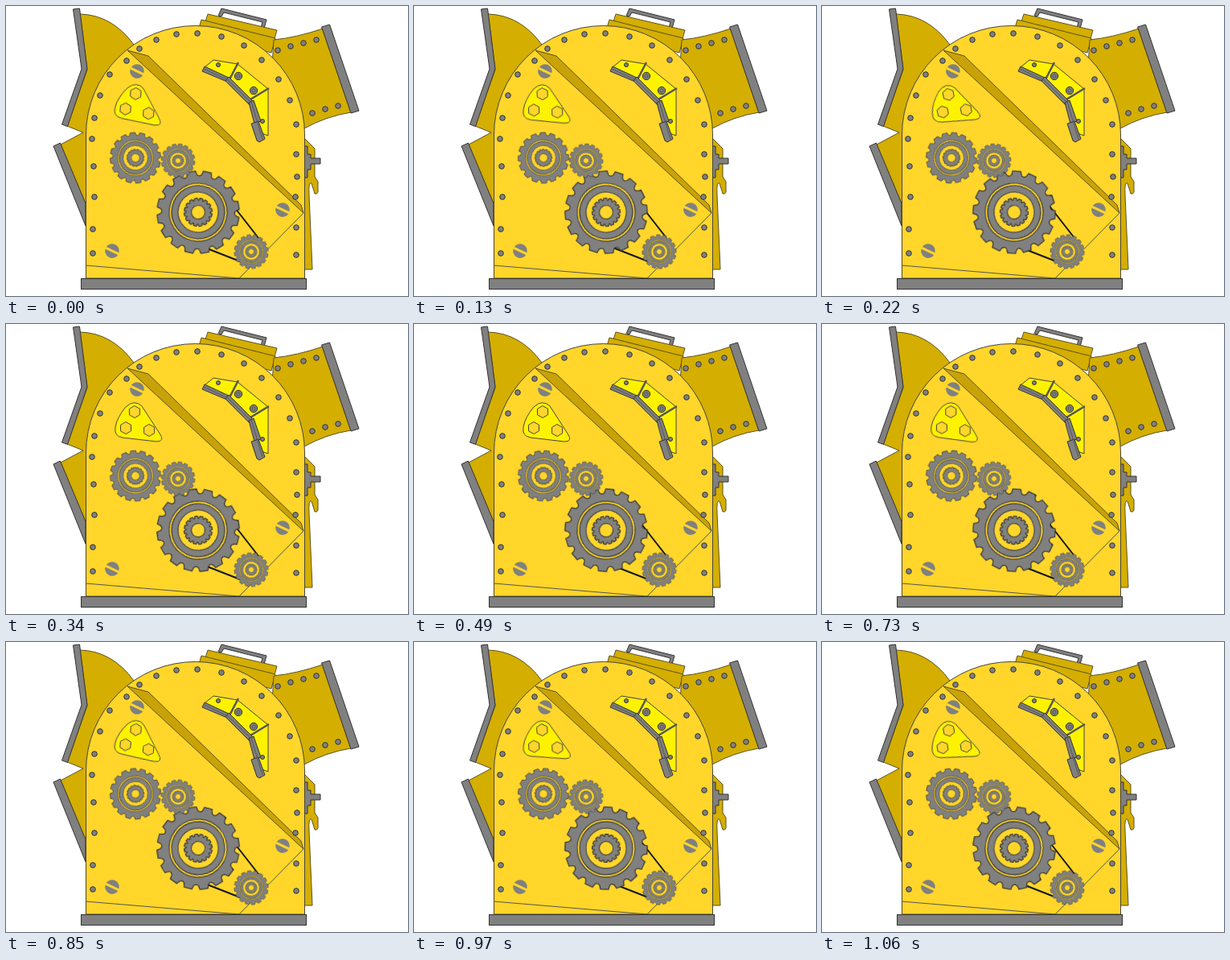
An HTML page for the animation above (1160 ms loop, 500 by 360 pixels).

```html
<!DOCTYPE html>
<html lang="en">
<head>
<meta charset="utf-8">
<title>Gear machine</title>
<style>
  html, body { margin: 0; width: 100%; height: 100%; overflow: hidden; background: #fff; }
  svg { display: block; width: 500px; height: 360px; }
  .body { fill: #ffd629; stroke: #444; }
  .dark { fill: #d4ae00; stroke: #5c5220; }
  .steel { fill: #808080; stroke: #333; }
  .bright { fill: #fff200; stroke: #444; }
  .line { fill: none; stroke: #555; }
  .belt { fill: none; stroke: #151515; stroke-width: 2; }

  .spin { animation: spin 1160ms infinite; }
  .plate { transform-origin: 163px 124px; animation: sway 1160ms infinite; }

  /* --w is the turn per 30 ms step; both ends of the loop rest for 100 ms */
  @keyframes spin {
    0% { transform: rotate(0deg); animation-timing-function: step-end; }
    8.6207% { transform: rotate(calc(var(--w) * 1deg)); animation-timing-function: steps(32); }
    91.3793%, 100% { transform: rotate(calc(var(--w) * 33deg)); }
  }
  @keyframes sway {
    0% { transform: rotate(5deg); animation-timing-function: step-end; }
    8.6207% { transform: rotate(2deg); animation-timing-function: steps(4); }
    18.9655% { transform: rotate(-11deg); animation-timing-function: steps(6); }
    34.4828% { transform: rotate(5deg); animation-timing-function: steps(6); }
    50% { transform: rotate(-5deg); animation-timing-function: steps(9); }
    73.2759% { transform: rotate(6deg); animation-timing-function: steps(7); }
    91.3793%, 100% { transform: rotate(-9deg); }
  }
</style>
</head>
<body>
<svg viewBox="0 0 500 360">
  <!-- chutes, lid and side lever -->
  <path class="dark" d="M92 10Q132 11 159 48L120 160V255H99L66 173L96 157L76 149L101 79Z"/>
  <path class="steel" d="M83.5 4L91.5 3L101 78L76.5 149.5L69.5 147L94 78Z"/>
  <path class="steel" d="M59 174L67.5 170L99 245V273Z"/>
  <path class="steel" d="M264 12L268 3L324 17L321 28L317 27L319 20L271 8L268 13Z"/>
  <path class="dark" d="M251 10L337 30L334 41L248 19Z"/>
  <path class="dark" d="M243 17L335 40L330 58L238 34Z"/>
  <path class="dark" d="M333 42Q362 39 394 28L429 132Q398 137 371 152L330 90Z"/>
  <path class="steel" d="M392.5 26L402.5 23L439 130L429 133Z"/>
  <path class="dark" d="M371 164L384 177V212L388 218V231Q387 234 384 233L380 220Q376 217 377 235L381 327H371Z"/>
  <path class="steel" d="M371 174h4v10h4v5h12v7h-12v7h-4v10h-4z"/>

  <!-- housing -->
  <path class="body" d="M99.5 338V160A136 135.5 0 0 1 371.5 160V338Z"/>
  <path class="line" d="M99 322L290 338L370 257"/>
  <path class="dark" style="fill:#c9a208" d="M151 55L177 62L367 247L370 257Z"/>
  <rect class="steel" x="93.5" y="338.5" width="280" height="13"/>
  <g id="rivets"></g>
  <g id="screws"></g>

  <!-- liner bracket -->
  <path class="bright" d="M258 67L288 72L326 103L326 161L318 158L304 119L277 91L247 76Z"/>
  <path class="line" stroke-width="2.5" d="M289 70L277 93M327 102L299 119"/>
  <path class="steel" d="M247 75L277 89L275 94L244 81Z"/>
  <path class="steel" d="M277 88L308 119L304 124L273 93Z"/>
  <path class="line" d="M246 78L276 92L306 121"/>
  <path class="steel" d="M302 120L308 117L317 143L309 146Z"/>
  <path class="steel" d="M305 146L314 143L322 165L315 169L312 167Z"/>
  <path class="line" d="M305 119L319 165"/>
  <g id="nuts"></g>

  <g class="plate">
    <path class="bright" d="M149 103Q160 93 169 102L191 136Q198 146 187 146L145 141Q134 139 136 128Q138 116 149 103Z"/>
    <g id="bolts"></g>
  </g>

  <path class="belt" d="M278 242L314 288M245 299L291 317"/>
  <g id="gears"></g>
</svg>
<script>
  const byId = id => document.getElementById(id);
  const dot = (x, y, r, kind = 'steel') => `<circle class="${kind}" cx="${x}" cy="${y}" r="${r}"/>`;

  const rivets = [
    [108,307],[108,277],[110,237],[109,199],[107,165],[110,139],[117,111],[129,85],
    [150,68],[166,53],[187,42],[212,35],[238,34],[268,38],[296,49],[318,67],[339,91],
    [353,117],[361,147],[361,184],[362,212],[360,237],[361,275],[361,309],
    [338,55],[354,50],[370,46],[386,42],[381,133],[397,128],[413,124]
  ];
  byId('rivets').innerHTML = rivets.map(([x, y]) => dot(x, y, 3.3)).join('');

  byId('screws').innerHTML = [[163, 81], [344, 253], [132, 304]].map(([x, y]) =>
    `<g transform="translate(${x} ${y}) rotate(25)">
      <circle r="8.8" fill="#808080"/>
      <rect x="-9" y="-1.5" width="18" height="3" fill="#ffd629"/>
    </g>`).join('');

  byId('nuts').innerHTML = dot(264, 73, 2.5) + dot(319, 143, 2.5) +
    [[289, 87], [308, 105]].map(([x, y]) => dot(x, y, 4.7) + dot(x, y, 2.2, 'line')).join('');

  const polar = (r, a) => `${(r * Math.cos(a)).toFixed(2)} ${(r * Math.sin(a)).toFixed(2)}`;

  const hex = [0, 1, 2, 3, 4, 5].map(i => polar(7.5, i * Math.PI / 3 + .5)).join('L');
  byId('bolts').innerHTML = [[160, 109], [149, 129], [178, 132]].map(([x, y]) =>
    `<path class="body" transform="translate(${x} ${y})" d="M${hex}Z"/>`).join('');

  // Toothed wheel outline: flat tips joined by rounded notches
  function wheel(tip, root, teeth) {
    const pitch = 2 * Math.PI / teeth;
    let d = '';
    for (let i = 0; i < teeth; i++) {
      const a = i * pitch, at = (r, f) => polar(r, a + f * pitch);
      d += `${i ? 'L' : 'M'}${at(tip, -.25)}L${at(tip, .25)}L${at(root + 2, .33)}` +
           `Q${at(root - 1.5, .5)} ${at(root + 2, .67)}`;
    }
    return d + 'Z';
  }

  const outer = wheel(51.3, 45, 16), inner = wheel(17.5, 14.5, 16);
  const ring = (r, kind) => dot(0, 0, r, kind);

  // x, y, radius, starting angle, turning sense
  const gears = [
    [161, 188.5, 32, 16, 1],
    [239, 256, 52, 13, 1],
    [214, 192, 21.3, 8, -1],
    [305, 305, 21.5, 14, 1]
  ];
  byId('gears').innerHTML = gears.map(([x, y, r, a, sense]) =>
    `<g transform="translate(${x} ${y}) rotate(${a}) scale(${r / 52})" stroke-width="1.2">
      <g class="spin" style="--w:${sense * 90 / 34}">
        <path class="steel" d="${outer}"/>
        ${ring(36, 'body')}${ring(33, 'steel')}${ring(25, 'body')}
        <path class="steel" d="${inner}"/>
        ${ring(8.5, 'body')}
      </g>
    </g>`).join('');
</script>
</body>
</html>
```
